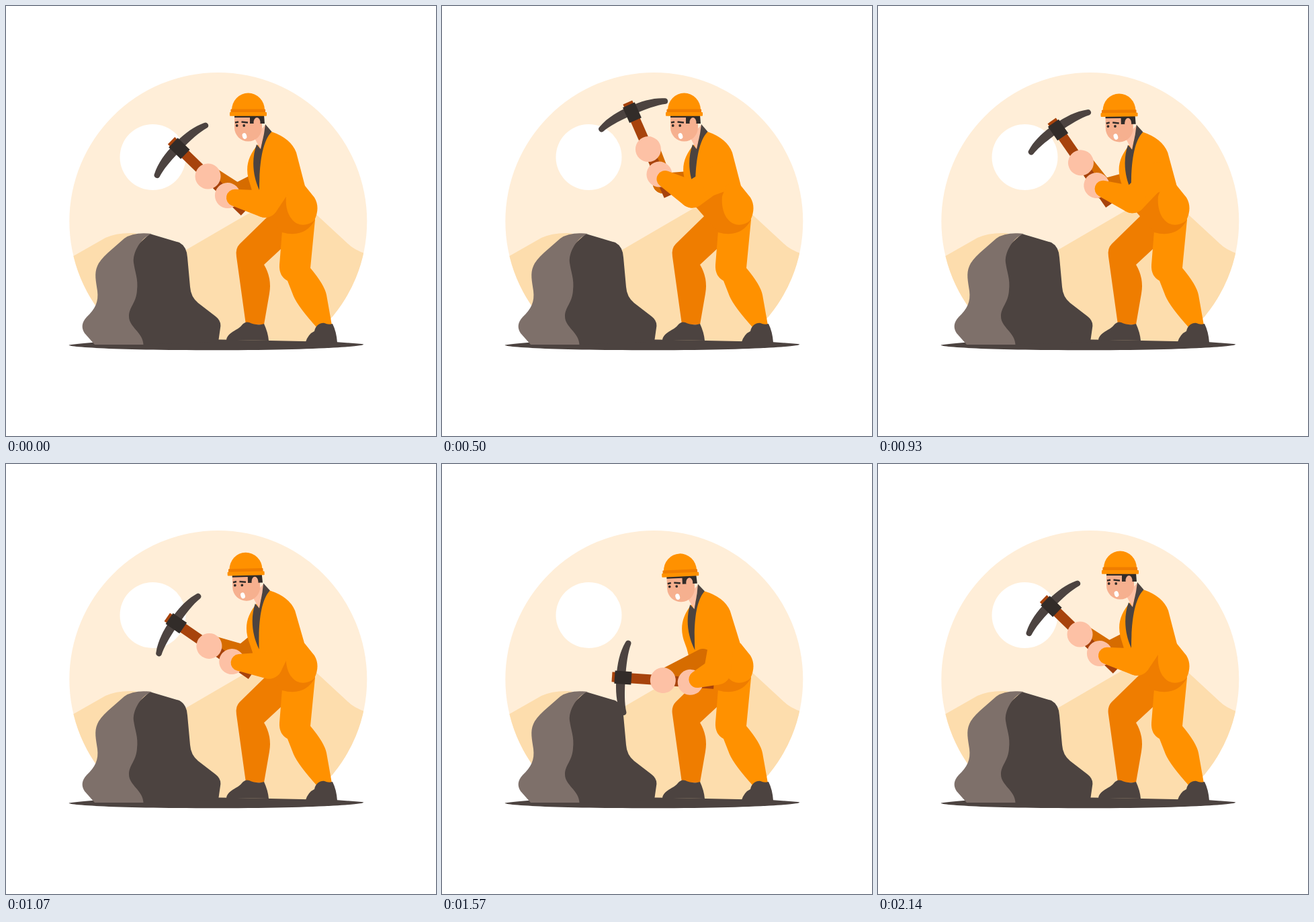
Recreate the animation shown at these times as an HTML page. Size 640 by 640 pixels, loop 2710 ms.

```html
<!DOCTYPE html>
<html lang="en">
<head>
<meta charset="utf-8">
<title>Miner</title>
<style>
  html, body { margin: 0; width: 100%; height: 100%; overflow: hidden; background: #fff; }
  svg { display: block; width: 100vw; height: 100vh; }
  .suit { fill: #ff9100; }
  .shade { fill: #ef7d00; }
  .deep { fill: #d66c00; }
  .dark { fill: #4c4340; }
  .black { fill: #322c29; }
  .wood { fill: #a7430c; }
  .skin { fill: #fdc1a5; }
  .face { fill: #f6b08f; }
</style>
</head>
<body>
<svg viewBox="0 0 640 640">
  <defs>
    <clipPath id="sky"><rect x="90" y="90" width="450" height="412"/></clipPath>
    <clipPath id="disc"><circle cx="315.8" cy="320.5" r="221.5"/></clipPath>
  </defs>

  <g clip-path="url(#sky)">
    <g clip-path="url(#disc)">
      <rect x="90" y="90" width="460" height="460" fill="#ffeed8"/>
      <path fill="#fdddad" d="M90 378L148 345Q165 337 190 338C230 345 245 377 268 363L395 289Q430 280 455 304L508 353Q518 363 536 369V510H90Z"/>
    </g>
  </g>
  <circle cx="218.5" cy="225" r="49" fill="#fff"/>

  <path class="dark" d="M94 504.500C130 498 250 496 320 496.500L490 500L530 503C545 505 480 512.300 314 512.300C150 512.300 88 507 94 504.500Z"/>
  <path class="dark" d="M214 339L258 352Q269 358 270 374L274 418Q275 433 286 442L312 462Q321 469 319 479L316 500L200 504L170 460L180 370Z"/>
  <path fill="#7e706a" d="M132 504L117 487Q109 475 120 463C133 451 138 440 136 424C134 410 131 398 136 387Q139 379 152 367L176 346Q190 336 217 339C200 345 188 368 190 382C192 397 197 406 195 423C194 442 183 448 183 462C183 478 204 486 204.500 504Z"/>

  <path class="shade" d="M390 313L348 354Q341 361 343 373L357 474H384L392 428Q396 405 384 385L412 359V313Z"/>
  <path class="suit" d="M411 335L407 385Q406 402 419 409L428 432Q435 448 463 479L485 475L477 430Q474 415 453 390L460 318Z"/>
  <path class="dark" d="M328 497C330 485 345 483 351 475Q356 469 362 471C370 475 378 475 384 473Q390 486 391 498Z"/>
  <path class="dark" d="M446 500Q450 488 459 484C461 475 468 471 474 472Q480 475 486 473Q492 485 493 501Z"/>
  <path class="shade" d="M376 297L390 313L411 337Q445 346 460 318L436 280L400 262Z"/>

  <path id="farUpper" class="deep"/>

  <g id="body">
    <path class="suit" d="M395 187Q424 197 432 218L445 268L418 277L376 292L368 285Q366 272 361 258C356 238 361 222 376 205Z"/>
    <path class="skin" d="M369 195L379 214L387 176Z"/>
    <path class="dark" d="M386 176L395.500 187C380 203 377 240 377 274C366 250 366 225 373 206L379 213L384 190Z"/>
    <path class="face" d="M340 163H381V181A20.500 20.500 0 0 1 340 181Z"/>
    <path class="black" d="M340 162H384L385 175H363V166H340Z"/>
    <ellipse class="face" cx="373.500" cy="173.500" rx="5" ry="7.500"/>
    <rect class="face" x="369" y="173" width="9" height="9"/>
    <circle class="black" cx="343.700" cy="178" r="1.900"/>
    <circle class="black" cx="354.200" cy="178" r="1.900"/>
    <path d="M341 173.500L346 172.500M350.500 172.500L360 173.500" stroke="#322c29" stroke-width="2.600"/>
    <ellipse cx="355" cy="193.500" rx="3.200" ry="4.500" fill="#fff" transform="rotate(-18 355 193.500)"/>
    <path class="suit" d="M336 155A24.500 25.500 0 0 1 385 155Z"/>
    <rect class="shade" x="334.500" y="153.500" width="51.500" height="6" rx="1"/>
    <rect class="suit" x="333" y="158" width="55" height="5.700" rx="1"/>
  </g>

  <path class="suit" d="M444.500 267L459 285Q468 300 459 319C449 328 434 328 426 318C417 308 416 292 417 283L425 262Z"/>
  <path id="crease" class="shade"/>
  <path id="farFore" class="deep"/>

  <g id="pick">
    <rect class="wood" x="-117" y="-7.500" width="152" height="15"/>
    <path class="dark" d="M-100.500 -53C-108 -38 -110.500 -20 -110.500 0S-108 38 -100.500 53A4.400 4.400 0 0 0 -92 51C-96 38 -97 20 -97 0S-96 -38 -92 -51A4.400 4.400 0 0 0 -100.500 -53Z"/>
    <rect class="black" x="-113" y="-9.700" width="25" height="19.400"/>
    <circle class="skin" cx="-41" cy="0" r="19"/>
    <circle class="skin" cx="0" cy="0" r="19"/>
  </g>

  <path id="nearUpper" class="suit"/>
  <path id="nearFore" class="suit"/>
</svg>

<script>
const LOOP = 2710, FPS = 14;
const REST = 44.2, RAISED = 71, STRUCK = -2;

const el = id => document.getElementById(id);
const mix = (a, b, k) => a + (b - a) * k;
const joint = (x, y, r) => ({ x, y, r });

function ease(u, power = 1) {
  const k = u ** power;
  return k * k * (3 - 2 * k);
}

// A joint at a polar offset from another one; the angle is in degrees.
function offset({ x, y }, dist, deg, r) {
  const t = deg * Math.PI / 180;
  return joint(x + dist * Math.cos(t), y + dist * Math.sin(t), r);
}

// Tapered limb: two round joints and their common tangents.
function limb(id, p, q) {
  const dx = q.x - p.x, dy = q.y - p.y;
  const dir = Math.atan2(dy, dx);
  const spread = Math.acos((p.r - q.r) / Math.hypot(dx, dy));
  const at = (j, t) => `${j.x + j.r * Math.cos(t)} ${j.y + j.r * Math.sin(t)}`;
  const arc = (j, large, t) => `A${j.r} ${j.r} 0 ${+large} 1 ${at(j, t)}`;
  el(id).setAttribute('d',
    `M${at(p, dir + spread)}${arc(p, p.r > q.r, dir - spread)}` +
    `L${at(q, dir - spread)}${arc(q, q.r > p.r, dir + spread)}Z`);
}

// Each stroke of the swing takes ten steps, then the miner rests.
function stance(step) {
  const u = step % 10 / 10;
  if (step < 10) return { angle: mix(REST, RAISED, ease(u, 0.88)), lean: 0 };
  if (step < 20) return { angle: mix(RAISED, STRUCK, ease(u)), lean: ease(u) };
  if (step < 30) {
    const k = ease(u, 0.93);
    return { angle: mix(STRUCK, REST, k), lean: 1 - k };
  }
  return { angle: REST, lean: 0 };
}

function draw(step) {
  const { angle: a, lean } = stance(step);
  const sq = a * a;

  // The lower hand leads; the pick and both arms follow from its angle.
  const hand = joint(375.5 - 1.524 * a + 0.01115 * sq, 328 - 0.78 * a - 0.00587 * sq);
  el('pick').setAttribute('transform', `translate(${hand.x} ${hand.y}) rotate(${a})`);
  el('body').setAttribute('transform', `rotate(${-3 * lean} 442 289)`);

  const elbow = joint(412 - 0.6 * a, 309 - 0.1 * a - 0.005 * sq, 20);
  limb('nearFore', offset(hand, 11, a - 27, 12.5), elbow);
  limb('nearUpper', elbow, joint(418, 250, 18));

  const grip = offset(offset(hand, -41, a), 8, a - 90, 9);
  const farElbow = joint(394 - 1.45 * a + 0.007 * sq, 290 + 0.05 * a - 0.0067 * sq, 15);
  limb('farFore', grip, farElbow);
  limb('farUpper', farElbow, joint(380, 256, 11));

  const k = Math.max(0, (a - 41) / 30);
  el('crease').setAttribute('d', `M428.5 250l${-7 * k} ${3 * k}l${k} ${11 * k}Z`);
}

let shown = -1;
function tick(now) {
  const step = Math.floor((now % LOOP + 5) * FPS / 1000);
  if (step !== shown) draw(shown = step);
  requestAnimationFrame(tick);
}
tick(performance.now());
</script>
</body>
</html>
```
